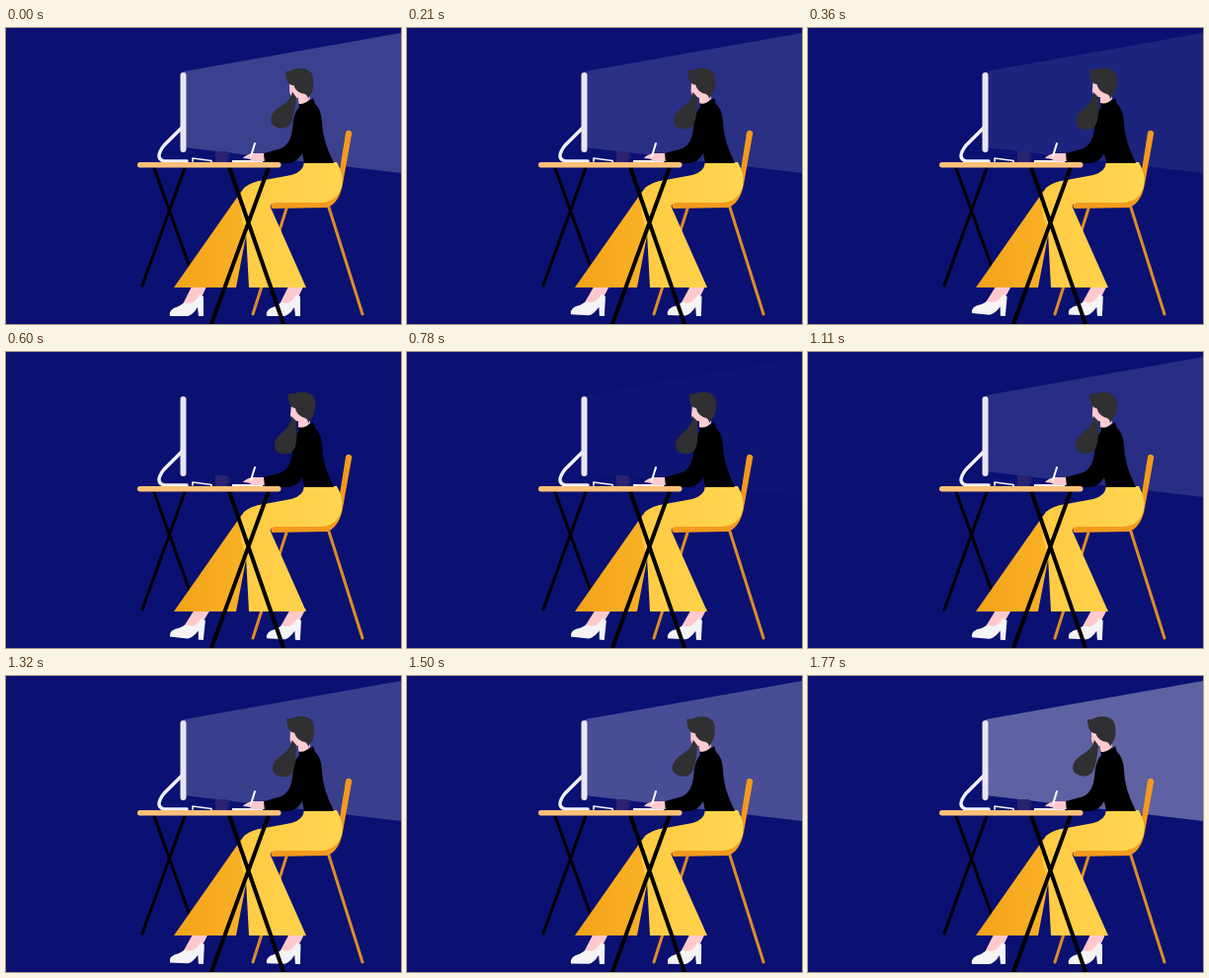
An HTML page for the animation above (1.8 s loop, 400 px wide and 300 px high).

```html
<!DOCTYPE html>
<html lang="en">
<head>
<meta charset="utf-8">
<title>Working late</title>
<style>
  html, body { margin: 0; width: 100%; height: 100%; overflow: hidden; background: #0a1172; }
  svg { display: block; width: 100vw; height: 100vh; }
</style>
</head>
<body>
<svg viewBox="0 0 400 300">
  <defs>
    <linearGradient id="farLeg" x1="0" x2="1">
      <stop offset="0" stop-color="#f3a21a"/>
      <stop offset="1" stop-color="#fcb729"/>
    </linearGradient>
    <linearGradient id="nearLeg" x1="0" x2="1">
      <stop offset="0" stop-color="#ffcb43"/>
      <stop offset="1" stop-color="#ffd650"/>
    </linearGradient>
    <g id="foot">
      <path fill="#ffc9cb" d="M179 280L189 260H204L198 273Q190 284 179 280Z"/>
      <path fill="#f4f4f6" d="M166 292Q164 285 175 282L181 278Q190 282 196 270L200 272V292H195L194 283Q189 291 184 292Z"/>
    </g>
  </defs>
  <rect width="400" height="300" fill="#0a1172"/>
  <path id="beam" fill="#fff" d="M180 44L400 5V147L180 121Z"/>

  <g fill="none" stroke="#000" stroke-width="3" stroke-linecap="round">
    <path d="M150 142L191 256M181 142L138 261"/>
  </g>

  <!-- chair -->
  <path fill="#f39a1d" d="M344 106Q345 103 348 104Q351 105 350 108L341 158Q338 176 326 182L270 183Q267 181 269 177L318 176Q334 174 337 150Z"/>
  <path fill="none" stroke="#df8c26" stroke-width="3" stroke-linecap="round" d="M284 183L250 290M327 182L361 290"/>

  <g id="leftFoot"><use href="#foot"/></g>
  <g id="rightFoot"><use href="#foot" x="98"/></g>

  <!-- trousers -->
  <path fill="url(#farLeg)" d="M262 154Q246 156 238 166L170 263H233L246 195L270 165Z"/>
  <path fill="url(#nearLeg)" d="M302 136H335Q342 148 340 160Q336 176 319 177H273Q266 178 268 182L304 263H246L243 207Q232 175 241 162Q248 156 262 154L289 149Q301 146 302 136Z"/>

  <!-- monitor, cup and stationery -->
  <g fill="none" stroke="#f1eff8" stroke-linecap="round" stroke-linejoin="round">
    <path stroke-width="3.5" d="M178 101L160 119Q150 132 160 135H183"/>
    <path stroke="#e9e6f3" stroke-width="6" d="M179.500 48V123"/>
    <path stroke-width="1.700" d="M189 135V132L208 134.500V136"/>
  </g>
  <path fill="#2b2370" d="M212 125H224V136H212Z"/>
  <path fill="none" stroke="#2b2370" stroke-width="1.500" d="M224 127Q228 129 224 133"/>
  <path fill="#f5f3fa" d="M229 134H260V137H229Z"/>

  <!-- upper body -->
  <path fill="#ffc9cf" d="M263 127L249 127Q242 129 240 132Q247 132 250 135H263Z"/>
  <path stroke="#fff" stroke-width="2" stroke-linecap="round" d="M248 130L252 117"/>
  <path fill="#000" d="M296 75Q304 77 311 71L313 77Q319 82 320 95Q320 113 332 137H302L300 127Q295 136 286 137H262L261 127L279 122Q288 118 290 103Q291 86 297 80Z"/>

  <g id="head">
    <path fill="#ffcbd0" d="M289 53L288 64Q289 70 296 70V76Q302 78 308 72L307 53Z"/>
    <path fill="#302f31" d="M286 42Q291 43 295 41Q306 39 312 46Q315 55 311 65L306 72Q306 67 300 66Q294 63 293 57Q285 56 286 42Z"/>
  </g>
  <path id="tail" fill="#302f31" d="M289 65C290 79 272 82 272 95C272 102 279 104 286 103C295 101 295 88 294 70Z"/>

  <!-- desk -->
  <path fill="none" stroke="#000" stroke-width="4" d="M226 141L281 300M266 141L208 300"/>
  <rect x="133" y="136" width="145.500" height="5.500" rx="2.700" fill="#fcc178"/>
</svg>
<script>
const LOOP = 1800, STEP = 30;
const light = [[0, .2], [600, 0], [740, 0], [1800, .35]];
const sway = [[0, 1], [180, .55], [360, .15], [600, 0], [780, 0], [1110, .2], [1320, .55], [1500, .85], [1770, 1], [1800, 1]];
const el = id => document.getElementById(id);
const parts = ['beam', 'head', 'tail', 'leftFoot', 'rightFoot'].map(el);
const [beam, head, tail, leftFoot, rightFoot] = parts;

function at(keys, t) {
  const i = keys.findIndex(k => k[0] > t);
  const [t0, a] = keys[i - 1], [t1, b] = keys[i];
  return a + (b - a) * (t - t0) / (t1 - t0);
}

const turn = (node, angle, x, y) =>
  node.setAttribute('transform', `rotate(${angle} ${x} ${y})`);

function draw(t) {
  const s = at(sway, t);
  beam.setAttribute('opacity', at(light, t));
  turn(head, -6 * s, 303, 72);
  turn(tail, 9 * s, 293, 70);
  turn(leftFoot, 6 * (1 - s), 199, 290);
  turn(rightFoot, 3 * (1 - s), 297, 290);
}

const start = performance.now();
function tick() {
  const t = (performance.now() - start) % LOOP;
  draw(Math.floor(t / STEP) * STEP);
  requestAnimationFrame(tick);
}
tick();
</script>
</body>
</html>
```
